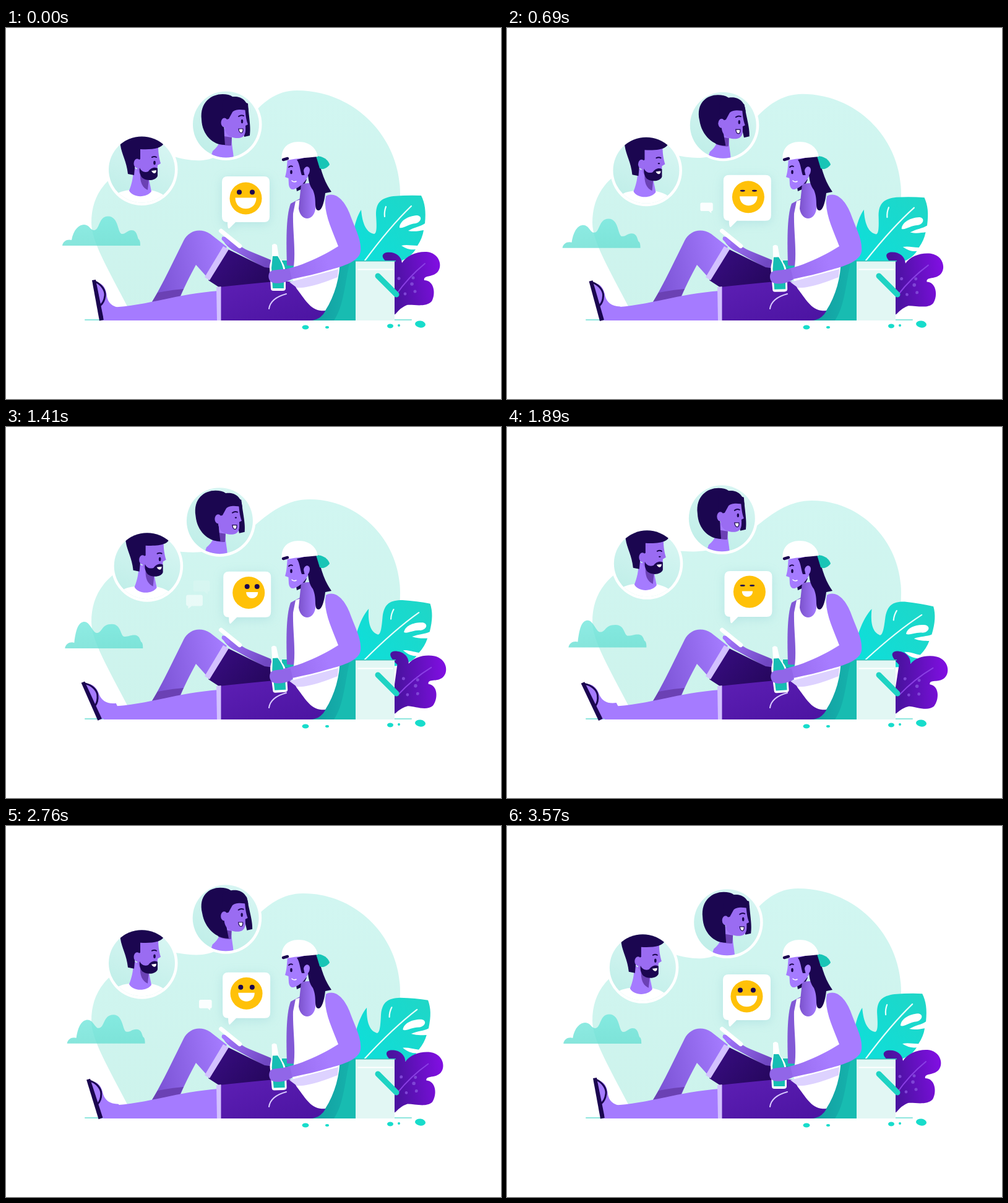
Write an HTML page that moves like this. It is 800 px wide and 600 px high and loops after 3600 ms.

```html
<!DOCTYPE html>
<html lang="en">
<head>
<meta charset="utf-8">
<title>Picnic chat</title>
<style>
html, body { margin: 0; width: 100%; height: 100%; overflow: hidden; background: #fff; }
svg { display: block; width: 800px; height: 600px; }
.dark { fill: #1b0650; }
.skin { fill: #a57bff; }
.face { fill: #9a6cf2; }
.shade { fill: #6b41b4; }
.teal { fill: #17dccb; }
.white { fill: #fff; }
.line { fill: none; stroke-linecap: round; stroke-linejoin: round; }
#bubble { filter: drop-shadow(0 3px 8px rgba(110, 185, 200, .26)); }
</style>
</head>
<body>
<svg viewBox="0 0 800 600">
<defs>
  <linearGradient id="sky" x1="0" y1="0" x2="0" y2="1">
    <stop offset="0" stop-color="#d1f6f1"/><stop offset="1" stop-color="#cdf3ec"/>
  </linearGradient>
  <linearGradient id="disc" x1=".7" y1="0" x2=".3" y2="1">
    <stop offset="0" stop-color="#d8f6f3"/><stop offset="1" stop-color="#bfeee8"/>
  </linearGradient>
  <linearGradient id="mist" x1="0" y1="0" x2="0" y2="1">
    <stop offset="0" stop-color="#72e7dd"/><stop offset="1" stop-color="#69dfd3"/>
  </linearGradient>
  <linearGradient id="leafFill" x1="0" y1="1" x2="1" y2="0">
    <stop offset="0" stop-color="#0be0dd"/><stop offset="1" stop-color="#20d6c6"/>
  </linearGradient>
  <linearGradient id="plumFill" x1="0" y1=".6" x2="1" y2=".4">
    <stop offset=".2" stop-color="#4a12a0"/><stop offset="1" stop-color="#7f0fe0"/>
  </linearGradient>
  <linearGradient id="shinFill" x1="0" y1=".6" x2="1" y2=".4">
    <stop offset="0" stop-color="#7a52d4"/><stop offset="1" stop-color="#a57cff"/>
  </linearGradient>
  <linearGradient id="shortsFill" x1="0" y1="0" x2="1" y2="1">
    <stop offset="0" stop-color="#5d1fb4"/><stop offset="1" stop-color="#4b13a1"/>
  </linearGradient>
  <linearGradient id="thighFill" x1="0" y1="0" x2="1" y2=".5">
    <stop offset="0" stop-color="#390d84"/><stop offset="1" stop-color="#26075e"/>
  </linearGradient>
  <linearGradient id="armFill" gradientUnits="userSpaceOnUse" x1="425" y1="400" x2="520" y2="375">
    <stop offset="0" stop-color="#9166e8"/><stop offset="1" stop-color="#a77cff"/>
  </linearGradient>
  <linearGradient id="backArmFill" x1="0" y1="0" x2="1" y2=".5">
    <stop offset=".1" stop-color="#a176fa"/><stop offset="1" stop-color="#7047c2"/>
  </linearGradient>
  <linearGradient id="neckFill" x1="0" y1="0" x2="1" y2="0">
    <stop offset="0" stop-color="#7b52cc"/><stop offset="1" stop-color="#a57bff"/>
  </linearGradient>
  <linearGradient id="seatFill" x1="0" y1="0" x2="1" y2="0">
    <stop offset="0" stop-color="#0c8797"/><stop offset=".55" stop-color="#13a3a4"/><stop offset="1" stop-color="#16b5ad"/>
  </linearGradient>
  <clipPath id="manClip"><circle cx="219.5" cy="229" r="53.5"/></clipPath>
  <clipPath id="womanClip"><circle cx="355.5" cy="156" r="53.5"/></clipPath>
</defs>

<path id="blob" fill="url(#sky)"/>
<path id="cloud" fill="url(#mist)" opacity=".8"/>

<g id="man">
  <circle cx="219.5" cy="229" r="58" class="white"/>
  <circle cx="219.5" cy="229" r="53.5" fill="url(#disc)"/>
  <g clip-path="url(#manClip)">
    <path class="white" d="M160 295 C168 268 186 263 202 262 L233 262 C252 266 262 272 274 295Z"/>
    <path class="skin" d="M206 225 C206 242 203 253 199 263 C205 275 228 275 235 264 L230 240Z"/>
    <path class="shade" d="M217 234 L231 243 L229 262 C220 258 216 249 217 234Z"/>
    <path class="face" d="M214 192 L246 190 C246 201 247 209 250 219 L245 222 L244 240 L222 244 L212 230Z"/>
    <path class="dark" d="M185 190 C183 180 195 184 199 177 C205 167 221 166 232 166 C246 166 256 175 255 186 C252 195 236 197 217 196 L217 212 L209 216 L207 238 L197 236 C195 216 187 204 185 190Z"/>
    <ellipse class="face" cx="212" cy="219" rx="5.5" ry="7.5"/>
    <path class="dark" d="M216 226 C219 233 225 234 230 232 C233 227 240 224 245 227 L245 239 C243 247 228 248 221 243 C217 239 215 233 216 226Z"/>
    <path class="white" d="M235 231 L243 230 C243 236 238 237 235 231Z"/>
    <path class="line" stroke="#1b0650" stroke-width="2" d="M236 209 Q240 207 243 209"/>
    <ellipse id="manEye" class="dark" cx="240" cy="218" rx="1.8" ry="3.3"/>
  </g>
</g>

<g id="woman">
  <circle cx="355.5" cy="156" r="58" class="white"/>
  <circle cx="355.5" cy="156" r="53.5" fill="url(#disc)"/>
  <g clip-path="url(#womanClip)">
    <path class="skin" d="M350 160 C350 178 345 190 334 199 L329 214 L368 214 C368 200 364 190 365 176Z"/>
    <path class="shade" d="M346 174 L365 177 L364 190 C355 191 347 188 343 186Z"/>
    <path class="dark swing" d="M316 148 C313 120 332 107 350 107 C364 107 372 113 373 122 L366 140 L352 150 L353 176 L354 189 C336 190 317 174 316 148Z"/>
    <path class="dark swing" d="M378 118 L391 122 C393 148 396 160 394 174 L385 176Z"/>
    <path class="face" d="M362 128 L386 126 C387 140 388 148 391 156 L387 158 C388 171 386 178 374 178 C362 178 353 172 353 158 L354 142Z"/>
    <path class="dark" d="M350 118 C364 107 390 107 392 134 C382 131 370 131 366 136 L360 147 L349 150Z"/>
    <ellipse class="face" cx="353" cy="153" rx="5.5" ry="7.5"/>
    <path class="white" stroke="#1b0650" stroke-width="1.2" d="M376 163 L383 163 C384 172 377 172 376 163Z"/>
    <path class="line" stroke="#1b0650" stroke-width="2" d="M376 143 Q380 140 384 142"/>
    <ellipse id="womanEye" class="dark" cx="381.5" cy="151" rx="1.7" ry="3.2"/>
  </g>
</g>

<g id="minis"></g>

<g id="bubble">
  <path class="white" d="M358 240 H417 Q426 240 426 249 V305 Q426 314 417 314 H371 L361 324 Q358 326 358 314 Q349 314 349 305 V249 Q349 240 358 240Z"/>
</g>
<g id="emoji">
  <circle cx="387.5" cy="275.5" r="26" fill="#ffc108"/>
  <ellipse class="dark eye" cy="265.5" rx="4"/>
  <ellipse class="dark eye" cy="265.5" rx="4"/>
  <path id="mouth" class="white"/>
</g>

<g id="leaf">
  <path fill="url(#leafFill)" d="M560 384 C556 350 562 312 574 294 C576 318 583 331 595 333 C600 332 599 318 598 302 C598 282 606 275 626 272 Q650 270 671 271 C677 283 679 296 677 316 C670 321 660 322 650 328 C660 330 668 328 675 327 Q673 340 665 352 C655 352 647 350 639 352 C648 358 655 359 662 358 Q652 374 630 379 L600 392Z"/>
  <path class="white" d="M636 323 C636 312 650 304 664 303 C674 304 671 314 662 316 C650 317 642 325 636 323Z"/>
  <path class="line" stroke="#e6fffb" stroke-width="2.2" d="M580 376 C603 345 630 312 655 288 M612 305 Q611 297 614 289"/>
</g>

<g id="plum">
  <path fill="url(#plumFill)" d="M622 468 V384 C608 374 604 366 615 363 C628 361 639 368 640 380 C647 368 664 361 680 362 C700 364 706 384 698 394 C690 404 674 399 676 408 C692 408 695 430 688 442 C679 452 660 447 648 448 Q638 452 630 462Z"/>
  <path class="line" stroke="#8a3fe4" stroke-width="2" d="M630 432 Q650 403 677 381"/>
  <g fill="#7f45d6">
    <circle cx="635" cy="405" r="2.5"/><circle cx="658" cy="404" r="2.5"/><circle cx="656" cy="414" r="2.8"/>
    <circle cx="645" cy="430" r="2.4"/><circle cx="661" cy="426" r="2.5"/>
  </g>
</g>

<path class="line" stroke="#8fe6de" stroke-width="2" d="M128 472 H655"/>
<g class="teal">
  <ellipse cx="484" cy="484" rx="5.5" ry="3.5"/><ellipse cx="519" cy="484" rx="3" ry="2"/>
  <ellipse cx="621" cy="482" rx="5" ry="3.4"/><ellipse cx="635" cy="481" rx="2" ry="2"/>
  <ellipse cx="669.5" cy="479" rx="8.5" ry="5.5" transform="rotate(8 669 479)"/>
</g>

<path fill="url(#seatFill)" d="M446 376 H565 V473 H488 L470 392 L446 392Z"/>
<path fill="#16bdb3" d="M446 376 H470 V389 H446Z"/>
<path fill="#18bcb1" d="M566 376 V473 H530 C546 450 548 410 556 376Z"/>
<path fill="#e2f7f4" d="M565 376 H628 V473 H565Z"/>
<path fill="#2fbfb6" d="M565 376 H630 V377.5 H565Z"/>
<path class="line" stroke="#fff" stroke-width="2" d="M569 390.5 H625"/>
<path class="line" stroke="#1ed3c3" stroke-width="9" d="M601 401 L631 431"/>

<path fill="url(#shinFill)" d="M236 443 C254 413 274 370 287 344 C296 327 314 323 330 333 L357 354 L325 403 L307 383 C298 400 287 420 280 440Z"/>
<path class="shade" d="M236 443 L245 428 Q265 424 287 422 L278 440Z"/>

<path fill="#8259d6" d="M454 384 C453 350 452 305 460 284 L475 276 L474 385Z"/>
<path fill="url(#backArmFill)" d="M349 338 C354 336 362 341 368 346 C376 350 383 357 394 361 L428 375 L432 392 L418 388 L372 362 C362 358 351 348 349 338Z"/>
<rect class="white" x="340" y="337" width="46" height="7" rx="3.5" transform="rotate(39 363 340)"/>
<path class="line" stroke="#a57bff" stroke-width="5" d="M351 341 L359 348"/>

<path fill="url(#thighFill)" d="M359 358 L418 387 L440 390 L446 416 L347 421 L327 408Z"/>
<path fill="#d3c1ff" d="M351 353 L360 358 L329 408 L321 403Z"/>

<g id="foot">
  <path class="skin" d="M146 412 C157 412 162 422 163 434 C165 444 171 451 186 453 L190 471 L154 473Z"/>
  <path class="dark" d="M139 408 L145 407 L158 472 L151 473.5Z"/>
  <path class="line" stroke="#1b0650" stroke-width="3" d="M144 410 C155 415 161 425 160 433 C159 441 156 446 152 449"/>
</g>
<path class="skin" d="M168 452 C230 449 275 430 345 425 V473 H158 C156 462 160 454 168 452Z"/>
<path fill="url(#shortsFill)" d="M345 419 Q390 414 445 409 L478 412 L516 458 Q508 473 490 473 H345Z"/>
<path fill="#d3c1ff" d="M340 419 L347.500 418 V473 H341Z"/>
<path class="line" stroke="#d8c9ff" stroke-width="2" d="M425 454 C427 441 438 434 453 430"/>

<path class="white" d="M468 280 L514 264 C512 296 528 325 537 352 C544 380 537 425 516 457 C493 460 483 438 470 422 Q462 410 463 396 C470 370 463 330 464 300Z"/>
<path fill="#ddd2ff" d="M458 411 L537 390 L536 403 C508 414 485 421 470 420Z"/>

<path class="dark" d="M466 240 L486 245 L479 260 L470 264Z"/>
<path fill="url(#neckFill)" d="M477 252 L499 250 C501 270 501 284 500 293 C497 313 476 313 473 292Z"/>
<path class="skin" d="M455 211 L490 208 L488 240 Q480 256 465 261 Q458 262 457 253 L456.500 243 L451 241 C454 232 454 222 455 211Z"/>
<path class="dark" d="M470 213 L503 205 C508 226 513 247 526 265 L516 267 C514 284 510 296 504 295 C497 292 503 278 496 262 C490 254 489 247 488 238 L478 238 C475 230 475 220 470 213Z"/>
<path class="skin" d="M481 231 C482 223 490 222 491 229 C491 236 487 241 483 240Z"/>
<path fill="#18c5b6" d="M501 207 C513 207 521 214 523 221 C519 226 513 230 507 227Z"/>
<path class="white" d="M446 216 C443 196 454 184 473 184 C491 184 502 195 504 208 C484 210 463 211 446 216Z"/>
<path class="line" stroke="#1b0650" stroke-width="4.5" d="M448 213 L455 211"/>
<ellipse class="dark" cx="461" cy="233" rx="1.8" ry="3.2"/>
<path class="line" stroke="#1b0650" stroke-width="1.8" d="M457 225 Q460 222 463 224"/>
<path class="line" stroke="#fff" stroke-width="1.6" d="M462 247 Q465 250 469 248"/>

<g id="bottle">
  <path class="white" d="M430 351 Q434 347 438 351 L441 371 C449 380 452 387 452 400 V421 Q452 425 447 425 H432 Q428 425 428 421 L426 388 C426 380 429 376 430 369Z"/>
  <path fill="#16bdb3" d="M431 369 H439 C446 380 449 388 449 400 V421 H431 L429 388Z"/>
</g>
<path fill="url(#armFill)" d="M517 272 C531 264 546 277 555 299 C563 322 575 342 573 361 C571 377 547 385 520 392 C494 400 465 405 450 409 L448 391 C478 385 510 370 537 353 C527 326 512 298 517 272Z"/>
<path id="hand" fill="#9166e8" d="M426 395 C430 390 446 391 458 389 L462 406 C452 412 438 415 429 411 C424 408 423 400 426 395Z"/>
</svg>
<script>
const LOOP = 3600, TAU = Math.PI * 2;
const $ = id => document.getElementById(id);
const set = (el, name, value) => el.setAttribute(name, value);
const move = (id, x, y) => set($(id), 'transform', `translate(${x} ${y})`);
const clamp = v => Math.max(0, Math.min(1, v));
const smooth = v => (1 - Math.cos(Math.PI * clamp(v))) / 2;
const eyes = document.querySelectorAll('.eye');
const swing = document.querySelectorAll('.swing');

// Sine-eased interpolation over [time, value] pairs
function track(t, keys) {
  for (let i = 1; i < keys.length; i++) {
    const [t0, v0] = keys[i - 1], [t1, v1] = keys[i];
    if (t <= t1) return v0 + (v1 - v0) * smooth((t - t0) / (t1 - t0));
  }
  return keys[keys.length - 1][1];
}
const glance = [[0, 0], [900, .5], [1410, 5.5], [1840, -3.5], [2700, 0], [LOOP, 0]];

// Openness of an eye, dipping around each given time
const blink = (t, ...times) => Math.min(...times.map(m => .35 + .65 * smooth((Math.abs(t - m) - 45) / 90)));

// Small chat bubbles: lifetime, path, width range, tail side, peak opacity
const rising = { x: [328, 315], y: [316, 252], w: [15, 28], tail: 1, peak: .9 };
const minis = [
  { ...rising, from: 90, to: 1530 },
  { ...rising, from: 2130, to: 3570 },
  { from: 1200, to: 1760, x: [300, 312], y: [276, 288], w: [28, 25], tail: -1, peak: .55 },
  { from: 2080, to: 2620, x: [402, 402], y: [335, 312], w: [14, 22], tail: -1, peak: .75 }
];
for (const m of minis) {
  m.el = document.createElementNS('http://www.w3.org/2000/svg', 'path');
  set(m.el, 'class', 'white');
  set(m.el, 'd', 'M-9 -8 H9 Q12 -8 12 -5 V5 Q12 8 9 8 V12 L4 8 H-9 Q-12 8 -12 5 V-5 Q-12 -8 -9 -8Z');
  $('minis').append(m.el);
}
function drawMini(m, t) {
  const p = clamp((t - m.from) / (m.to - m.from));
  const mix = ([a, b]) => a + (b - a) * p;
  const s = mix(m.w) / 24;
  set(m.el, 'transform', `translate(${mix(m.x)} ${mix(m.y)}) scale(${s * m.tail} ${s})`);
  set(m.el, 'opacity', m.peak * smooth(p / .3) * smooth((1 - p) / .3));
}

function draw(t) {
  const a = t / LOOP * TAU, C = Math.cos(a), S = Math.sin(a);
  const off = (c, s) => c * (1 - C) + s * S;
  const k = (1 - C) / 2;

  // The dome's right side is a quarter ellipse from its top to (637, 268)
  const tx = 470 + 23 * k, ty = 101 + 18 * k, dip = -14 * k;
  const bend = .552;
  set($('blob'), 'd', `M138 315 C138 264 168 220 268 ${207 + dip / 2}
    C296 ${215 + dip} 322 ${219 + dip} 345 ${205 + dip}
    C${380 + 10 * k} ${182 + 8 * k} ${tx - 68} ${ty} ${tx} ${ty}
    C${tx + (637 - tx) * bend} ${ty} 637 ${268 - (268 - ty) * bend} 637 268 Q637 310 630 350
    L600 472 H205 L197 452 C165 390 138 345 138 315Z`);

  const cx = 91 + off(3.9, -4.2), cy = 352 + off(2.5, 2.4);
  const h1 = 39 - 5 * C, h2 = 44 + 5.5 * C - 2 * Math.cos(2 * a), h3 = 23 + 2 * C;
  const top = 35 - 4 * k, peak = 74 + 2 * k;
  set($('cloud'), 'd', `M${cx} ${cy} c1 -8 9 -11 15 -9 C${cx + 18} ${cy - h1 + 8} ${cx + top - 8} ${cy - h1} ${cx + top} ${cy - h1}
    C${cx + top + 9} ${cy - h1} ${cx + 45} ${cy - 25} ${cx + 51} ${cy - 25}
    C${cx + 61} ${cy - 25} ${cx + 58} ${cy - h2} ${cx + peak} ${cy - h2}
    C${cx + 92} ${cy - h2} ${cx + 89} ${cy - 18} ${cx + 97} ${cy - 19}
    C${cx + 103} ${cy - 19} ${cx + 105} ${cy - h3} ${cx + 112} ${cy - h3}
    C${cx + 122} ${cy - h3} ${cx + 121} ${cy - 11} ${cx + 124} ${cy - 10} Q${cx + 126} ${cy - 8} ${cx + 126} ${cy}Z`);

  move('man', off(3.7, 3.3), off(-3.8, 3.9));
  move('woman', off(-4.4, -3.6), off(-3.8, 3.9));
  const skew = .06 * (1 - Math.cos(2 * a));
  swing.forEach(el => set(el, 'transform', `matrix(1 0 ${skew} 1 ${-136 * skew} 0)`));
  set($('manEye'), 'ry', 3.3 * blink(t, 690, 1890));
  set($('womanEye'), 'ry', 3.2 * blink(t, 1410));

  move('bubble', off(1.25, 0), off(-3.5, 0));
  move('emoji', off(2.3, 1), off(-4.5, .7));
  const fx = 387.5 + track(t, glance), gap = 9.1 + 1.4 * C, r = 12.8 + 4.2 * C;
  eyes.forEach((eye, i) => {
    set(eye, 'cx', fx + (i ? gap : -gap));
    set(eye, 'ry', 4 * blink(t, 690, 1890));
  });
  set($('mouth'), 'd', `M${fx - r} 274.5 H${fx + r} C${fx + r} ${274.5 + r * 1.4} ${fx - r} ${274.5 + r * 1.4} ${fx - r} 274.5Z`);
  minis.forEach(m => drawMini(m, t));

  set($('leaf'), 'transform', `rotate(${off(5.4, -1.6)} 580 375)`);
  set($('plum'), 'transform', `rotate(${off(4.4, 0)} 625 460)`);
  set($('foot'), 'transform', `translate(${-4 * k} 0) rotate(${-15 * k} 157 470)`);
  set($('bottle'), 'transform', `translate(${1.5 * k} ${5 * k}) rotate(${-4 * k} 438 390)`);
  move('hand', 2 * k, 2 * k);
}

function tick() {
  draw(performance.now() % LOOP);
  requestAnimationFrame(tick);
}
tick();
</script>
</body>
</html>
```
